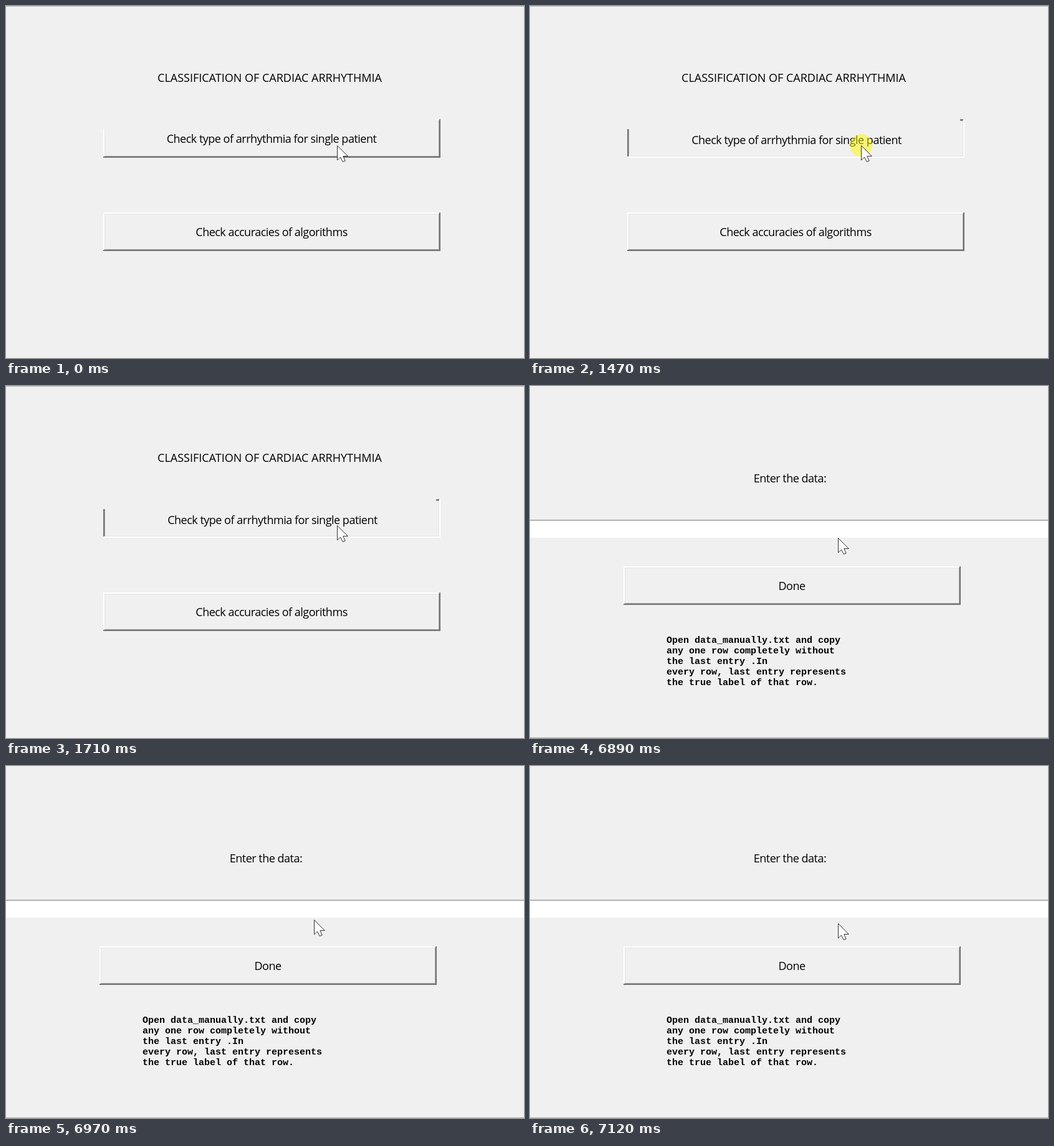
An HTML page with a canvas that plays this animation: 831x566 px, repeating every 8 s.

```html
<!DOCTYPE html>
<html lang="en">
<head>
<meta charset="utf-8">
<style>
  html, body { margin: 0; width: 100%; height: 100%; overflow: hidden; background: #f0f0f0; }
  canvas { display: block; }
</style>
</head>
<body>
<canvas id="stage" width="831" height="566"></canvas>
<script>
const ctx = document.getElementById('stage').getContext('2d');
const LOOP = 8000;
const FACE = '#f0f0f0';
const UI = '"Open Sans", "Noto Sans", sans-serif';
const MONO = '"Liberation Mono", monospace';
const HELP = [
  'Open data_manually.txt and copy',
  'any one row completely without',
  'the last entry .In',
  'every row, last entry represents',
  'the true label of that row.'
];

function rect(x, y, w, h, color) {
  ctx.fillStyle = color;
  ctx.fillRect(x, y, w, h);
}

function text(str, x, y, font, align = 'center', spacing = 0) {
  ctx.font = font;
  ctx.textAlign = align;
  ctx.letterSpacing = `${spacing}px`;
  ctx.fillStyle = '#000';
  ctx.fillText(str, x, y);
}

const label = (str, x, y, spacing = -0.5) => text(str, x, y, `18px ${UI}`, 'center', spacing);

// Two nested edges: the light pair and the dark pair swap sides when pressed.
function bevel(x, y, w, h, pressed) {
  const light = ['#fff', '#e3e3e3'], dark = ['#747474', '#a0a0a0'];
  const [topLeft, bottomRight] = pressed ? [dark, light] : [light, dark];
  [[0, 2], [2, 1]].forEach(([inset, t], i) => {
    const l = x + inset, u = y + inset, bw = w - 2 * inset, bh = h - 2 * inset;
    rect(l, u, bw, t, topLeft[i]);
    rect(l, u, t, bh, topLeft[i]);
    rect(l, u + bh - t, bw, t, bottomRight[i]);
    rect(l + bw - t, u, t, bh, bottomRight[i]);
  });
}

function button(str, x, y, pressed = false) {
  bevel(x, y, 541, 62, pressed);
  const shift = pressed ? 1.5 : 0;
  label(str, x + 270 + shift, y + 38 + shift);
}

function arrow(x, y) {
  ctx.save();
  ctx.translate(x + 0.5, y + 0.5);
  ctx.beginPath();
  ctx.moveTo(0, 0);
  for (const [px, py] of [[0, 23.5], [5, 18.5], [8.7, 26], [12.7, 24.5], [9.3, 17], [16.8, 17]]) ctx.lineTo(px, py);
  ctx.closePath();
  ctx.fillStyle = '#fff';
  ctx.fill();
  ctx.strokeStyle = '#1c1c24';
  ctx.lineWidth = 0.9;
  ctx.stroke();
  ctx.restore();
}

function textCursor() {
  rect(496, 224, 2, 23, '#000');
  for (const y of [223, 246]) {
    rect(490, y, 6, 2, '#000');
    rect(498, y, 6, 2, '#000');
  }
}

function drawMenu(t) {
  const pressed = t >= 1470;
  rect(0, 0, 831, 1, '#b4b4b4');
  label('CLASSIFICATION OF CARDIAC ARRHYTHMIA', 423, 122, 0);
  button('Check type of arrhythmia for single patient', 156, 182, pressed);
  rect(156, 182, 534, 16, FACE); // the heading's box hides the button's top edge
  button('Check accuracies of algorithms', 156, 332);
  if (pressed && t < 1710) {
    ctx.fillStyle = 'rgba(255, 250, 0, 0.5)';
    ctx.beginPath();
    ctx.arc(531, 224, 18, 0, 2 * Math.PI);
    ctx.fill();
  }
  arrow(531, 224);
}

function drawForm(t) {
  label('Enter the data:', 417, 155);
  rect(0, 215, 831, 1.5, '#a0a0a0');
  rect(0, 217, 831, 27, '#fff');
  button('Done', 150, 290);
  HELP.forEach((line, i) => text(line, 219, 413 + 17 * i, `bold 15px ${MONO}`, 'left'));
  rect(0, 565, 831, 1, '#b0b0b0');
  if (t < 6890) textCursor();
  else arrow(494, 244 + 3 * Math.min(3, Math.floor((t - 6890) / 76.6)));
}

function frame(now) {
  const t = now % LOOP;
  rect(0, 0, 831, 566, FACE);
  if (t < 5350) drawMenu(t);
  else drawForm(t);
  requestAnimationFrame(frame);
}
requestAnimationFrame(frame);
</script>
</body>
</html>
```
